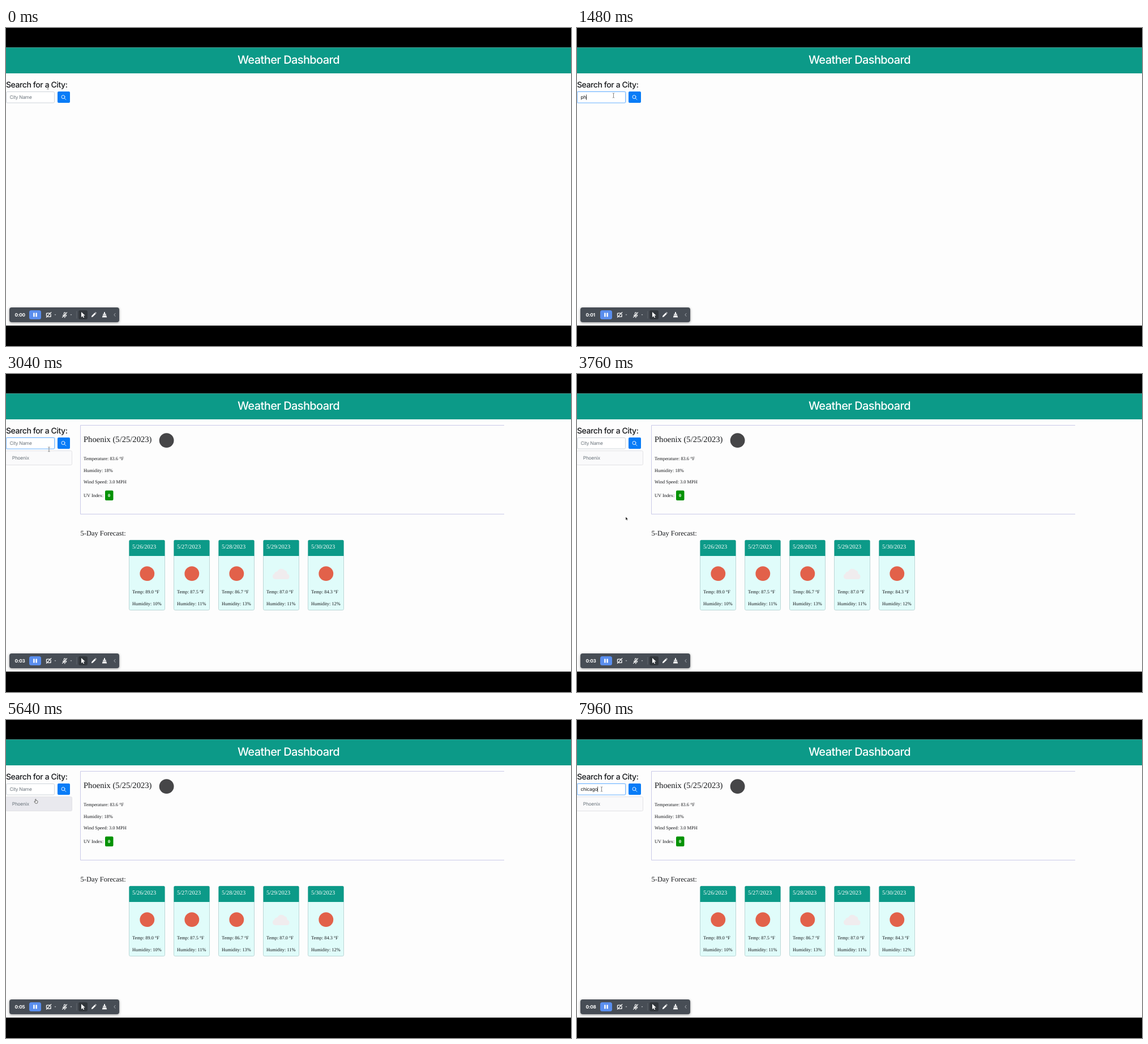
Animation of 998x561 px, one loop 8 s. Source, as an HTML page:

```html
<!DOCTYPE html>
<html lang="en">
<head>
<meta charset="utf-8">
<title>Weather Dashboard</title>
<style>
  html, body { margin: 0; width: 100%; height: 100%; overflow: hidden; background: #000; }
  svg { display: block; width: 100%; height: 100%; }
  text { font-family: "Liberation Serif", "Times New Roman", serif; font-size: 8.35px; fill: #16181b; text-rendering: geometricPrecision; white-space: pre; }
  .ui { font-family: Inter, sans-serif; font-size: 8.4px; letter-spacing: -.03em; }
  .title { font-size: 20px; font-weight: 500; fill: #fff; text-anchor: middle; }
  .label { font-size: 14px; font-weight: 500; }
  .muted { fill: #6c757d; }
  .city { font-size: 14.6px; }
  .heading { font-size: 12.5px; }
  .date { font-size: 10.4px; fill: #fff; }
  .badge { fill: #fff; text-anchor: middle; font-weight: 700; }
  .clock { font-size: 8.2px; font-weight: 700; fill: #fff; }
  .line { fill: none; stroke: #c9c9e8; }
  .icon { fill: none; stroke: #fff; stroke-width: 1.3; stroke-linecap: round; stroke-linejoin: round; }
</style>
</head>
<body>
<svg viewBox="0 0 998 561">
  <defs>
    <filter id="shadow" x="-10%" y="-40%" width="120%" height="190%">
      <feDropShadow dx="0" dy="1" stdDeviation="2" flood-opacity=".4"/>
    </filter>
  </defs>
  <rect width="998" height="561"/>
  <rect y="34.5" width="998" height="490.5" fill="#fdfdfd"/>
  <rect y="34.5" width="998" height="45.5" fill="#0c9a88"/>
  <text class="ui title" x="499" y="63">Weather Dashboard</text>

  <text class="ui label" y="104.5">Search for a City:</text>
  <rect id="ring" x="-1" y="111.2" width="88" height="21.6" rx="3" fill="#bfdeff"/>
  <rect id="input" x=".5" y="112.5" width="85" height="19.5" rx="2" fill="#fff"/>
  <text class="ui" id="typed" x="6.5" y="125.2"></text>
  <rect id="caret" y="117.5" width=".8" height="9.5" fill="#222"/>
  <rect x="91" y="112" width="22" height="20" rx="2" fill="#087cf7"/>
  <g class="icon" style="stroke-width:.9"><circle cx="101" cy="121.6" r="3"/><path d="M103.2 123.8l2.6 2.6"/></g>

  <g id="history">
    <rect id="item" x="-.5" y="135.5" width="117" height="25" rx="2" stroke="#e2e2e5"/>
    <text class="ui muted" x="10.8" y="150.8">Phoenix</text>
  </g>
  <g id="partial"></g>
  <g id="complete"></g>

  <g filter="url(#shadow)"><rect x="6" y="493" width="194" height="26" rx="4" fill="#474d54"/></g>
  <text class="ui clock" id="clock" x="15.5" y="508.8"></text>
  <rect x="41" y="498" width="21" height="16" rx="3.5" fill="#5a8eee"/>
  <path d="M48.2 502.5h2.4v7h-2.4zM52.4 502.5h2.4v7h-2.4z" fill="#fff"/>
  <g class="icon">
    <path d="M72 503.2h5.5M71.5 503.5v4.5M74 509.3h5v-4.5M71.5 510.2l8.3-8.6"/>
    <path d="M102.5 506v-3a1.3 1.3 0 0 1 2.6 0v3a1.3 1.3 0 0 1-2.6 0M100.6 506.2q.5 3 3.2 3t3-3M103.8 509.2v1.8M99.6 510.4l8-8.6" stroke-width="1.1"/>
    <path d="M193 503.5l-2.2 2.5 2.2 2.5" stroke="#a9aeb4" stroke-width="1"/>
  </g>
  <path d="M85.6 505.3h2.8l-1.4 1.7zM113.6 505.3h2.8l-1.4 1.7z" fill="#c4c8cc"/>
  <path d="M124.5 499.5v13" stroke="#5b6168"/>
  <rect x="128" y="498" width="16" height="16" rx="3" fill="#32373c"/>
  <path d="M133 501v9.2l2.2-2 1.5 3.1 1.5-.7-1.5-3 3-.3z" fill="#fff"/>
  <path d="M150.8 510.2l.7-2.6 5.3-5.3 1.9 1.9-5.3 5.3zM157.4 501.7l.7-.7 1.9 1.9-.7.7z" fill="#fff"/>
  <path d="M173.1 501h1.8v3.2h1.8v1.8h-5.4v-1.8h1.8zM171 506.7h6l1.2 3.9h-8.4z" fill="#fff"/>

  <g id="cursor">
    <path id="ibeam" d="M-1.6-4h1.1l.5.6.5-.6h1.1M0-3.4v6.8M-1.6 4h1.1l.5-.6.5.6h1.1" fill="none" stroke="#666" stroke-width=".8"/>
    <path id="arrow" d="M-1-3v5.8l1.4-1.3.9 1.9.9-.4-.9-1.8h1.9z" fill="#111" stroke="#fff" stroke-width=".4"/>
    <path id="hand" d="M-1.2-3.6q.8-.8 1.2 0v2.2l2.4.6q.8.2.7 1l-.5 2.3-.6 1h-3l-2-2.6q-.3-1 .7-.7l1.1.8z" fill="#fff" stroke="#444" stroke-width=".8"/>
  </g>
</svg>
<script>
const LOOP = 8000, STEP = 40;
const $ = id => document.getElementById(id);
const show = (id, on) => $(id).style.display = on ? '' : 'none';
const text = (x, y, s, cls = '') => `<text x="${x}" y="${y}" class="${cls}">${s}</text>`;
const disc = (x, y, color) => `<circle cx="${x}" cy="${y}" r="12.9" fill="${color}"/>`;
const cloud = (x, y) => `<path transform="translate(${x} ${y})" fill="#f0ecee"
  d="M-11 10a5 5 0 0 1-1-9.5a5 5 0 0 1 5-4a8 8 0 0 1 13-2.5a6 6 0 0 1 4.5 6.5a5 5 0 0 1 1 9.5z"/>`;

const days = [
  ['5/26/2023', '89.0', 10], ['5/27/2023', '87.5', 11], ['5/28/2023', '86.7', 13],
  ['5/29/2023', '87.0', 11], ['5/30/2023', '84.3', 12]
];
const CLOUDY = 3;

function card([date, temp, humidity], i, loaded) {
  const x = 217.5 + i * (loaded ? 79 : 78.6), top = loaded ? 293 : 262.5, w = loaded ? 63 : 62.5;
  const hasIcon = loaded || i === CLOUDY;
  const wraps = !hasIcon && humidity !== 11;
  const height = hasIcon ? 123.5 : wraps ? 96 : 84;
  const base = top + (hasIcon ? 94 : 54.3), tx = x + 5.5;
  const icon = !hasIcon ? '' : i === CLOUDY ? cloud(x + 31.5, top + 59) : disc(x + 31.8, top + 59.2, '#e2614a');
  return `<rect x="${x}" y="${top}" width="${w}" height="${height}" rx="2.2" fill="#e0fcfa" stroke="#bcd6d6"/>
    <path d="M${x} ${top + 28}v-26q0-2 2-2h${w - 4}q2 0 2 2v26z" fill="#0c9a88"/>` + icon +
    text(tx, top + 15.4, date, 'date') + text(tx, base, `Temp: ${temp} °F`) +
    (wraps ? text(tx, base + 20.8, 'Humidity:') + text(tx, base + 33.3, humidity + '%')
           : text(tx, base + 20.8, `Humidity: ${humidity}%`));
}

function report(loaded) {
  const dy = loaded ? 30.2 : 0, bottom = 217 + dy;
  return `<path class="line" d="M880 90.5H131.5V${bottom}H880"/>` +
    text(137, loaded ? 119.6 : 104.5, 'Phoenix (5/25/2023)', 'city') +
    (loaded ? disc(283.6, 117.2, '#464648') : '') +
    text(137, 121.6 + dy, 'Temperature: 83.6 °F') + text(137, 142.5 + dy, 'Humidity: 18%') +
    text(137, 163.2 + dy, 'Wind Speed: 3.0 MPH') + text(137, 186.7 + dy, 'UV Index:') +
    `<rect x="175" y="${175.2 + dy}" width="14.5" height="17.5" rx="2" fill="#059205"/>` +
    text(182.2, 186.7 + dy, '0', 'badge') + text(131.5, 254.8 + dy, '5-Day Forecast:', 'heading') +
    days.map((day, i) => card(day, i, loaded)).join('');
}
$('partial').innerHTML = report(false);
$('complete').innerHTML = report(true);

const entries = [
  { word: 'phoenix', keys: [1400, 1470, 1600, 1720, 1830, 1940, 2060], focus: 880, blur: 3400, clear: 2240 },
  { word: 'chicago', keys: [7160, 7280, 7400, 7520, 7640, 7760, 7880], focus: 6320, blur: LOOP, clear: LOOP }
];
const path = [
  [0, 74, 104], [300, 73, 109], [800, 64.5, 119], [2240, 64.5, 119], [2600, 73.5, 127], [3080, 76, 133],
  [3760, 87, 255], [4240, 226, 300], [4400, 247, 305], [4800, 262, 318], [5120, 190, 255],
  [5560, 57, 156], [5640, 53, 143.5], [5920, 53, 143.5], [6280, 43.5, 122], [LOOP, 43.5, 122]
];

function cursorAt(t) {
  const i = path.findIndex(p => p[0] > t);
  const [t0, x0, y0] = path[i - 1], [t1, x1, y1] = path[i];
  const k = (t - t0) / (t1 - t0), e = k * k * (3 - 2 * k);
  return [x0 + (x1 - x0) * e, y0 + (y1 - y0) * e];
}

function drawInput(t) {
  const entry = entries.find(e => t >= e.focus && t < e.blur + 150);
  let value = '', glow = 0, caret = false;
  if (entry) {
    glow = Math.max(0, Math.min(1, (t - entry.focus) / 150, (entry.blur + 150 - t) / 150));
    const count = entry.keys.filter(k => k <= t).length;
    if (t < entry.clear) value = entry.word.slice(0, count);
    const lastKey = t >= entry.clear ? entry.clear : count ? entry.keys[count - 1] : entry.focus;
    caret = t < entry.blur && (t - lastKey) % 1000 < 500;
  }
  $('ring').style.opacity = glow;
  $('input').setAttribute('stroke', glow > .5 ? '#80bdff' : '#ced4da');
  const typed = $('typed');
  typed.textContent = value || 'City Name';
  typed.setAttribute('class', value ? 'ui' : 'ui muted');
  $('caret').setAttribute('x', 6.5 + (value ? typed.getComputedTextLength() : 0));
  show('caret', caret);
}

function frame() {
  const t = Math.floor(performance.now() % LOOP / STEP) * STEP;
  const [x, y] = cursorAt(t);
  const onItem = y >= 135.5 && y < 160.5 && x < 117;
  const onText = y < 135.5 || (x > 222 && x < 266 && y > 296 && y < 312);
  drawInput(t);
  show('history', t >= 2240);
  show('partial', t >= 2400 && t < 2720);
  show('complete', t >= 2720);
  $('item').setAttribute('fill', onItem ? '#e9e9ee' : '#fafafb');
  $('clock').textContent = '0:0' + Math.floor((t + 100) / 1000);
  $('cursor').setAttribute('transform', `translate(${x} ${y})`);
  show('ibeam', onText);
  show('hand', onItem);
  show('arrow', !onText && !onItem);
  requestAnimationFrame(frame);
}
frame();
</script>
</body>
</html>
```
